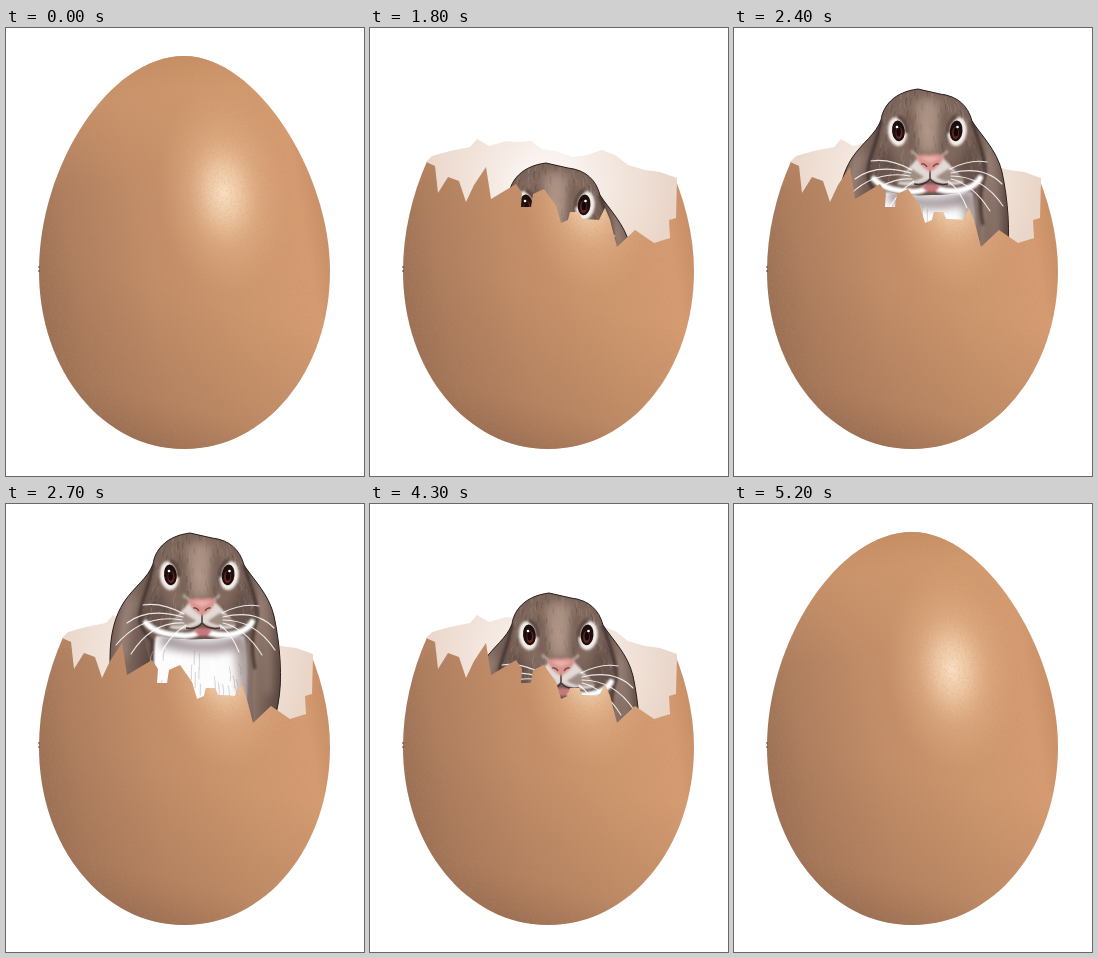
An HTML page that plays this animation: 358 by 448 pixels, repeating every 5500 ms.

```html
<!DOCTYPE html>
<html lang="en">
<head>
<meta charset="utf-8">
<title>Rabbit in an egg</title>
<style>
html, body { margin: 0; width: 100%; height: 100%; overflow: hidden; background: #fff; }
svg { display: block; width: 100%; height: 100%; }
#rabbit, #open { visibility: hidden; }
.whiskers { fill: none; stroke: #fff; stroke-width: 1.1; stroke-linecap: round; opacity: .85; }
</style>
</head>
<body>
<svg viewBox="0 0 358 448">
<defs>
  <path id="egg" d="M178 28C250 28 324 144 324 243C324 343 260 421 178 421C97 421 33 343 33 243C33 137 104 28 178 28Z"/>
  <clipPath id="eggClip"><use href="#egg"/></clipPath>
  <clipPath id="rim"><path d="M0 134H56L65 138L68 165L78 149L89 153L96 174L104 157L116 139L121 171L146 156L152 165L151 179H161L163 166L174 161L186 178L191 195L198 192L200 184H209L212 191L229 192L235 180L240 192L247 219L265 202L284 215L300 210L299 192L306 190L307 151L358 151V448H0Z"/></clipPath>
  <linearGradient id="base" gradientUnits="userSpaceOnUse" x1="33" y1="265" x2="324" y2="215">
    <stop offset="0" stop-color="#9c7155"/><stop offset=".13" stop-color="#ae7e5e"/>
    <stop offset=".38" stop-color="#c18c67"/><stop offset=".68" stop-color="#cd976d"/>
    <stop offset=".92" stop-color="#d69b71"/><stop offset="1" stop-color="#c98f66"/>
  </linearGradient>
  <linearGradient id="low" gradientUnits="userSpaceOnUse" x1="195" y1="270" x2="155" y2="421">
    <stop offset="0" stop-color="#9a6c50" stop-opacity="0"/><stop offset=".7" stop-color="#9a6c50" stop-opacity=".3"/>
    <stop offset="1" stop-color="#8d634b" stop-opacity=".65"/>
  </linearGradient>
  <linearGradient id="high" gradientUnits="userSpaceOnUse" x1="170" y1="28" x2="180" y2="150">
    <stop offset="0" stop-color="#c58c60" stop-opacity=".8"/><stop offset=".3" stop-color="#d39a6e" stop-opacity=".55"/>
    <stop offset="1" stop-color="#d39a6e" stop-opacity="0"/>
  </linearGradient>
  <radialGradient id="glow" gradientUnits="userSpaceOnUse" cx="0" cy="0" r="1" gradientTransform="translate(218 165) rotate(-6) scale(66 104)">
    <stop offset="0" stop-color="#ffe8cd" stop-opacity=".9"/><stop offset=".25" stop-color="#fcdcba" stop-opacity=".68"/>
    <stop offset=".55" stop-color="#edbd94" stop-opacity=".38"/><stop offset="1" stop-color="#e3ab80" stop-opacity="0"/>
  </radialGradient>
  <radialGradient id="lining" gradientUnits="userSpaceOnUse" cx="178" cy="156" r="124">
    <stop offset="0" stop-color="#fefcfb"/><stop offset=".45" stop-color="#f5eae3"/><stop offset="1" stop-color="#ead6c9"/>
  </radialGradient>
  <filter id="grain" x="0" y="0" width="1" height="1">
    <feTurbulence type="fractalNoise" baseFrequency=".45" numOctaves="2" seed="4"/>
    <feColorMatrix values="0 0 0 0 .48 0 0 0 0 .3 0 0 0 0 .2 2.4 0 0 0 -1.05"/>
  </filter>
  <filter id="soft1" x="-.3" y="-.3" width="1.6" height="1.6"><feGaussianBlur stdDeviation="1"/></filter>
  <filter id="soft4" x="-.5" y="-.5" width="2" height="2"><feGaussianBlur stdDeviation="4"/></filter>

  <g id="shell" clip-path="url(#eggClip)">
    <rect width="358" height="448" fill="url(#base)"/>
    <rect width="358" height="448" fill="url(#low)"/>
    <rect width="358" height="448" fill="url(#high)"/>
    <rect width="358" height="448" fill="url(#glow)"/>
    <rect width="358" height="448" filter="url(#grain)" opacity=".2"/>
  </g>

  <linearGradient id="ear" x1="0" x2="1" y1="0" y2=".3">
    <stop offset="0" stop-color="#5f4c45"/><stop offset=".45" stop-color="#8c7468"/><stop offset="1" stop-color="#5e4a43"/>
  </linearGradient>
  <radialGradient id="fur" gradientUnits="userSpaceOnUse" cx="192" cy="70" r="70">
    <stop offset="0" stop-color="#a18779"/><stop offset=".4" stop-color="#866e62"/><stop offset="1" stop-color="#63504a"/>
  </radialGradient>
  <path id="outline" d="M104 215V155C104 130 109 112 118 98C128 83 142 74 147 60C149 46 160 32 184 29L206 34C224 36 234 46 238 61C246 74 263 90 268 112C274 140 277 175 272 200L268 220"/>
  <clipPath id="body"><use href="#outline"/></clipPath>
  <path id="face" d="M147 62C150 42 164 30 185 29L207 34C226 38 235 48 238 63C243 78 253 97 250 113C246 128 232 135 198 135C164 137 142 131 136 119C133 101 145 82 147 62Z"/>
  <clipPath id="faceClip"><use href="#face"/></clipPath>
  <g id="eye">
    <ellipse cx="-.8" cy=".5" rx="9.5" ry="14.5" fill="#f4eeea" filter="url(#soft1)" transform="rotate(-8)"/>
    <path d="M0 -15Q9 -10 9 2" fill="none" stroke="#5b4740" stroke-width="4" filter="url(#soft1)"/>
    <ellipse cx=".4" rx="6.4" ry="10.4" fill="#1d0f0e" transform="rotate(-6)"/>
    <ellipse cx="1" cy="2" rx="3.5" ry="6" fill="#672720"/>
    <ellipse cx=".6" cy="1" rx="2.3" ry="4.6" fill="#150808"/>
    <circle cx="-1" cy="-4" r="1.3" fill="#fff"/>
  </g>
</defs>

<g id="open">
  <path fill="url(#lining)" d="M56 134L62 128L80 123L100 119L107 111L119 118L136 113L147 114L161 113L172 121L185 123L203 129L217 127L232 122L245 127L258 137L275 142L290 144L307 150V200L284 230L70 200Z"/>
  <g id="rabbit">
    <g clip-path="url(#body)">
      <rect x="100" y="25" width="180" height="200" fill="#6f5a50"/>
      <path fill="#fdfcfc" filter="url(#soft1)" d="M150 132Q145 150 148 215H238Q245 165 238 132Z"/>
      <g id="chest" fill="none" stroke-width="1.1"></g>
      <path fill="#85767b" opacity=".75" filter="url(#soft4)" d="M156 128Q198 148 238 128L240 143Q198 155 154 142Z"/>
      <path fill="#8d7d78" opacity=".7" filter="url(#soft4)" d="M228 140L250 135V215H236Z"/>
      <path fill="url(#ear)" d="M148 60C140 76 128 83 118 98C108 112 103 130 103 180L144 182C149 160 136 140 135 117C134 97 144 82 148 60Z"/>
      <path fill="url(#ear)" d="M237 60C246 72 264 90 270 112L278 222H247C249 180 240 155 246 130C250 105 238 90 237 60Z"/>
      <path fill="none" stroke="#b59f94" stroke-width="5" opacity=".6" filter="url(#soft4)" d="M130 94Q115 115 118 155M255 95Q264 130 262 190"/>
      <use href="#face" fill="url(#fur)"/>
      <g id="coat" fill="none" stroke-width=".8" opacity=".4" clip-path="url(#faceClip)"></g>
      <path fill="none" stroke="#382b27" stroke-width="3" opacity=".75" filter="url(#soft1)" d="M147 60C145 82 132 99 134 118Q137 128 146 137V165M238 61C243 80 254 100 251 116Q243 135 249 165"/>
      <path fill="none" stroke="#45352f" stroke-width="6" opacity=".6" filter="url(#soft4)" d="M174 52Q182 72 177 90M211 52Q204 72 210 90M152 88Q150 103 160 110M234 88Q237 102 228 110"/>
      <path fill="#b89f90" opacity=".65" filter="url(#soft4)" d="M182 42Q195 34 206 43L202 92H188Z"/>
      <path fill="none" stroke="#fff" stroke-width="6" stroke-linecap="round" filter="url(#soft1)" d="M140 119Q150 130 172 131Q184 133 191 129M204 129Q222 134 236 127Q243 124 246 118"/>
      <path fill="#f4efec" opacity=".85" filter="url(#soft1)" d="M184 98Q170 112 163 124Q180 129 196 119Q213 129 230 123Q222 110 209 98Z"/>
      <path fill="#8f7a70" opacity=".8" filter="url(#soft1)" d="M178 109Q167 114 161 121Q178 124 190 117ZM214 109Q226 114 232 120Q214 125 202 117Z"/>
      <path fill="none" stroke="#e9e0da" stroke-width="2" opacity=".7" filter="url(#soft1)" d="M177 91Q182 94 185 98M214 91Q209 94 207 98"/>
      <path fill="#c9787a" filter="url(#soft1)" d="M188 126Q197 122 206 126Q203 132 197 132Q191 132 188 126Z"/>
      <path fill="none" stroke="#43302c" stroke-width="1.4" d="M196 109V119Q191 126 180 124M196 119Q202 126 214 124"/>
      <path fill="#d8958f" filter="url(#soft1)" d="M182 97Q188 93 196 95Q205 92 210 97Q207 106 196 112Q186 107 182 97Z"/>
      <path fill="#f0bab3" opacity=".7" filter="url(#soft1)" d="M186 98Q196 95 206 98L196 103Z"/>
      <path fill="none" stroke="#70403b" stroke-width="1.2" d="M187 104Q191 103 193 107M205 104Q201 103 199 107"/>
      <use href="#eye" x="164" y="71"/>
      <use href="#eye" transform="translate(222.5 71) scale(-1 1)"/>
    </g>
    <use href="#outline" fill="none" stroke="#29211f" stroke-width="1"/>
    <path class="whiskers" d="M178 110Q156 98 137 101M177 113Q142 103 121 119M176 116Q137 109 110 141M178 119Q146 117 125 150M180 121Q163 132 154 151M216 109Q236 99 253 102M217 113Q250 105 268 124M217 116Q249 116 269 146M217 119Q239 124 256 151M214 121Q226 130 233 148"/>
  </g>
  <g clip-path="url(#rim)"><use href="#shell"/></g>
</g>
<use id="whole" href="#shell"/>
<path d="M33 238V246" stroke="#5c4030" stroke-width="1" stroke-dasharray="2 2"/>
</svg>
<script>
const LOOP = 5500;
const $ = id => document.getElementById(id);

let seed = 9;
const rnd = () => (seed = seed * 16807 % 2147483647) / 2147483647;

// short strokes that fan out from the middle of the box
function hair(id, count, x0, y0, w, h, len, dark, light) {
  let out = "";
  for (let i = 0; i < count; i++) {
    const x = x0 + rnd() * w, y = y0 + rnd() * h, lean = (x - x0 - w / 2) * .08;
    out += `<path d="M${x} ${y}q${lean} ${len / 2} ${lean * .5} ${len * (.7 + rnd() * .6)}" stroke="${i % 3 ? light : dark}"/>`;
  }
  $(id).innerHTML = out;
}
hair("chest", 60, 147, 138, 94, 50, 14, "#ddd6d6", "#fff");
hair("coat", 260, 134, 30, 118, 95, 7, "#46362f", "#b59c8e");

// each row: start time, style; every pose holds until the next
function play(id, rows) {
  const keys = rows.map(([t, style]) => ({ offset: t / LOOP, easing: "step-end", ...style }));
  keys.push({ ...keys[keys.length - 1], offset: 1 });
  $(id).animate(keys, { duration: LOOP, iterations: Infinity });
}
const show = { visibility: "visible" }, hide = { visibility: "hidden" };
const at = (x, y) => ({ ...show, transform: `translate(${x}px, ${y}px)` });
const gone = { ...hide, transform: "translate(-8px, 106px)" };

play("whole", [[0, show], [1500, hide], [5200, show]]);
play("open", [[0, hide], [1500, show], [5200, hide]]);
play("rabbit", [
  [0, gone], [1800, at(-8, 106)], [2100, at(-5, 60)], [2400, at(0, 32)], [2700, at(0, 0)],
  [4000, at(0, 32)], [4300, at(-5, 60)], [4600, at(-8, 106)], [4900, gone]
]);
</script>
</body>
</html>
```
